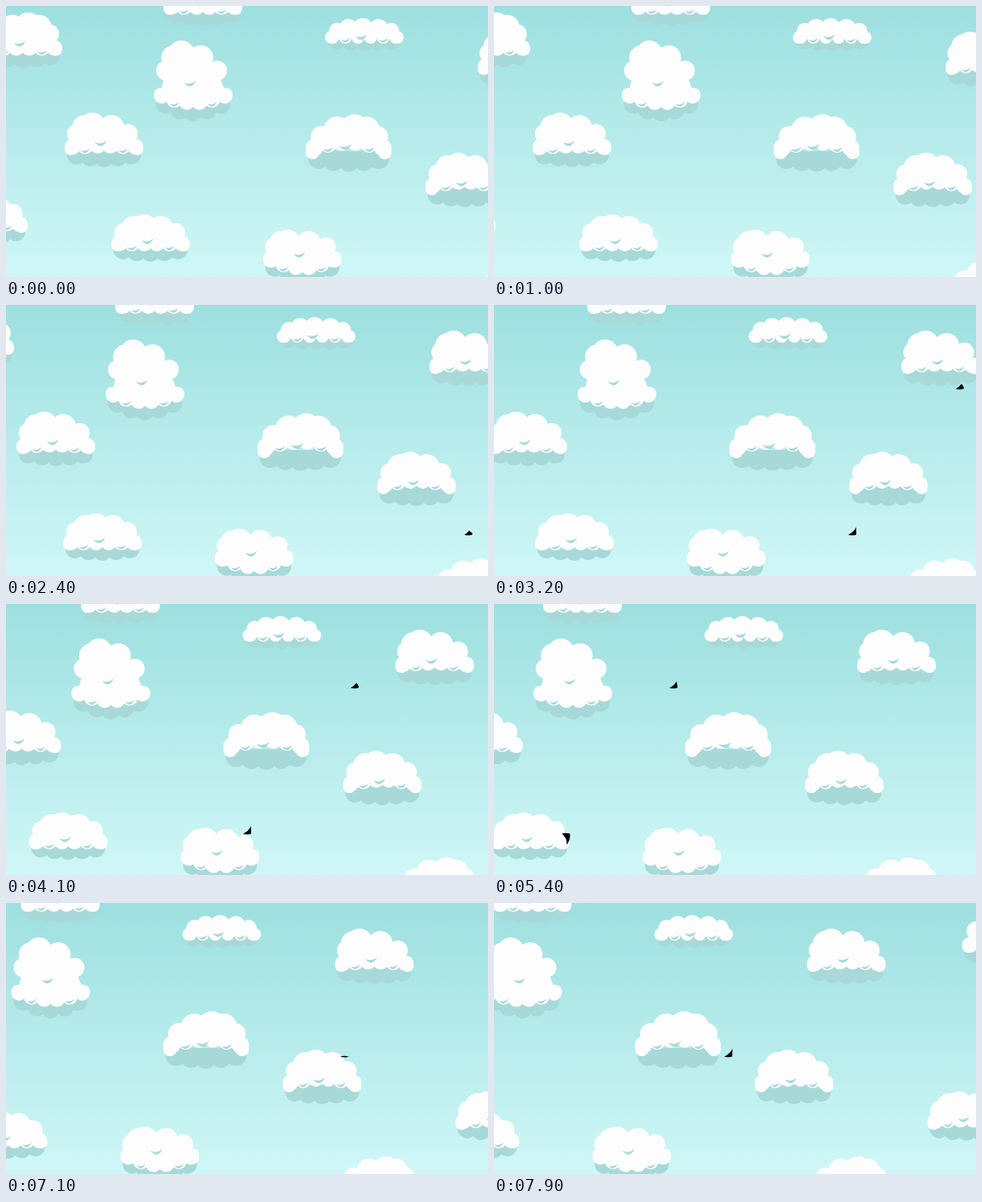
Write an HTML page with a canvas that moves like this. It is 600x338 px and loops after 8000 ms.

```html
<!DOCTYPE html>
<html lang="en">
<head>
<meta charset="utf-8">
<title>Clouds and birds</title>
<style>
html, body { margin: 0; width: 100%; height: 100%; overflow: hidden; }
canvas { display: block; width: 100vw; height: 100vh; }
</style>
</head>
<body>
<canvas width="600" height="338"></canvas>
<script>
const ctx = document.querySelector('canvas').getContext('2d');
const LOOP = 8, STEP = 0.1, WRAP = 808, CLOUD_SPEED = 25, BIRD_SPEED = 162;
const WHITE = '#fdfdfe', SHADE = '#a8d9d9', TAU = 2 * Math.PI;

// Left edge at time 0, top, base, peak as a part of the width, sag of the base, width
const clouds = [
  [-28, 8, 62, 0.57, 0],
  [196, -40, 11, 0.4, 0],
  [397, 15, 47, 0.48, 0],
  [184, 43, 118, 0.35, 12],
  [73, 133, 186, 0.35, -2],
  [373, 135, 191, 0.57, -11, 107],
  [522, 183, 236, 0.42, -7],
  [-71, 235, 283, 0.4, -3],
  [131, 260, 306, 0.42, 0],
  [320, 279, 322, 0.31, 14],
  [587, 32, 86, 0.31, -3],
  [592, 316, 368, 0.6, 0]
].map(makeCloud);

// x at time `at`, y of the back, flap period and phase of the raised wing
const birds = [
  { x: 575.5, at: 2.4, y: 286.5, period: 0.9, peak: 0.5 },
  { x: 434, at: 4.1, y: 104.5, period: 1.25, peak: 0.42 },
  { x: 534.5, at: 6.4, y: 191.5, period: 1.1, peak: 0.16 }
];

const sky = ctx.createLinearGradient(0, 0, 0, 338);
sky.addColorStop(0, '#9de0df');
sky.addColorStop(1, '#d0f7f7');

function range(n, item) {
  return Array.from({ length: n }, (_, i) => item(i / (n - 1)));
}

// Puffs [x, y, r] line the inside of a half ellipse with a shifted peak, then a scalloped base.
function makeCloud([x, top, base, peak, sag, w = 98]) {
  const h = base - top;
  const big = Math.min(0.17 * w, 0.38 * h), small = 0.08 * w;
  const dome = range(7, u => {
    const c = -Math.cos(Math.PI * u), s = Math.sin(Math.PI * u);
    const r = small + (big - small) * s;
    const side = w * (c < 0 ? peak : 1 - peak) - r;
    return [w * peak + c * side, base - r - s * (h - 2 * r), r];
  });
  const row = (n, from, to, r, bottom) => range(n, k => {
    const u = to + (from - to) * k;
    return [w * u, bottom(Math.sin(Math.PI * u)) - r, r];
  });
  const scallop = Math.min(0.1 * w, 0.25 * h);
  const foot = row(6, 0.1, 0.9, scallop, s => base + sag * s);
  const drop = 0.28 * h > 16 ? 14 : 0.28 * h;
  const under = row(5, 0.15, 0.85, 0.12 * w,
    s => base + Math.max(sag, 0) * s + drop * (0.6 + 0.4 * s));
  const smiles = [
    [0.46 * w, base - 0.3 * h, 0.075 * w],
    [0.26 * w, base - 5 + sag * 0.73, 0.06 * w],
    [0.74 * w, base - 5 + sag * 0.73, 0.06 * w]
  ];
  const shadow = [[0.12 * w, base - 10, 2], [0.9 * w, base - 10, 2], ...under];
  return { x, body: [...dome, ...foot], shadow, smiles };
}

function fillPuffs(puffs, color) {
  ctx.fillStyle = color;
  ctx.beginPath();
  for (const [x, y] of puffs) ctx.lineTo(x, y);
  ctx.closePath();
  for (const [x, y, r] of puffs) {
    ctx.moveTo(x + r, y);
    ctx.arc(x, y, r, 0, TAU);
  }
  ctx.fill();
}

function drawCloud({ body, shadow, smiles }, x) {
  ctx.save();
  ctx.translate(x, 0);
  fillPuffs(shadow, SHADE);
  fillPuffs(body, WHITE);
  ctx.fillStyle = SHADE;
  for (const [sx, y, w] of smiles) {
    ctx.beginPath();
    ctx.moveTo(sx - w, y);
    ctx.quadraticCurveTo(sx, y + w * 0.5, sx + w, y - 2);
    ctx.quadraticCurveTo(sx + 1, y + w * 1.4, sx - w, y);
    ctx.fill();
  }
  ctx.restore();
}

function drawBird(b, t) {
  const lift = Math.cos(TAU * (t / b.period - b.peak));
  ctx.save();
  ctx.translate(b.x - BIRD_SPEED * (t - b.at), b.y);
  ctx.fillStyle = '#000';
  ctx.beginPath();
  ctx.moveTo(-5, 0);
  if (lift > 0) {
    const tip = Math.max(9 * lift - 3.5, 0);
    ctx.quadraticCurveTo(tip - 3, -3 * lift, tip, -10 * lift);
    ctx.lineTo(5, -2);
    ctx.lineTo(5, 0);
  } else {
    const depth = 14 * lift * lift;
    ctx.lineTo(5, 0);
    ctx.quadraticCurveTo(6, depth * 0.5, 1, depth);
    ctx.quadraticCurveTo(2, depth * 0.4, -5, 0);
  }
  ctx.fill();
  ctx.beginPath();
  ctx.ellipse(0, 0, 4.5, 0.8, 0, 0, TAU);
  ctx.fill();
  ctx.restore();
}

function draw(now) {
  const t = Math.floor(now / 1000 % LOOP / STEP + 1e-6) * STEP;
  ctx.fillStyle = sky;
  ctx.fillRect(0, 0, 600, 338);
  for (const c of clouds) {
    const x = c.x - CLOUD_SPEED * t;
    drawCloud(c, x);
    drawCloud(c, x + WRAP);
  }
  for (const b of birds) drawBird(b, t);
  requestAnimationFrame(draw);
}
requestAnimationFrame(draw);
</script>
</body>
</html>
```
